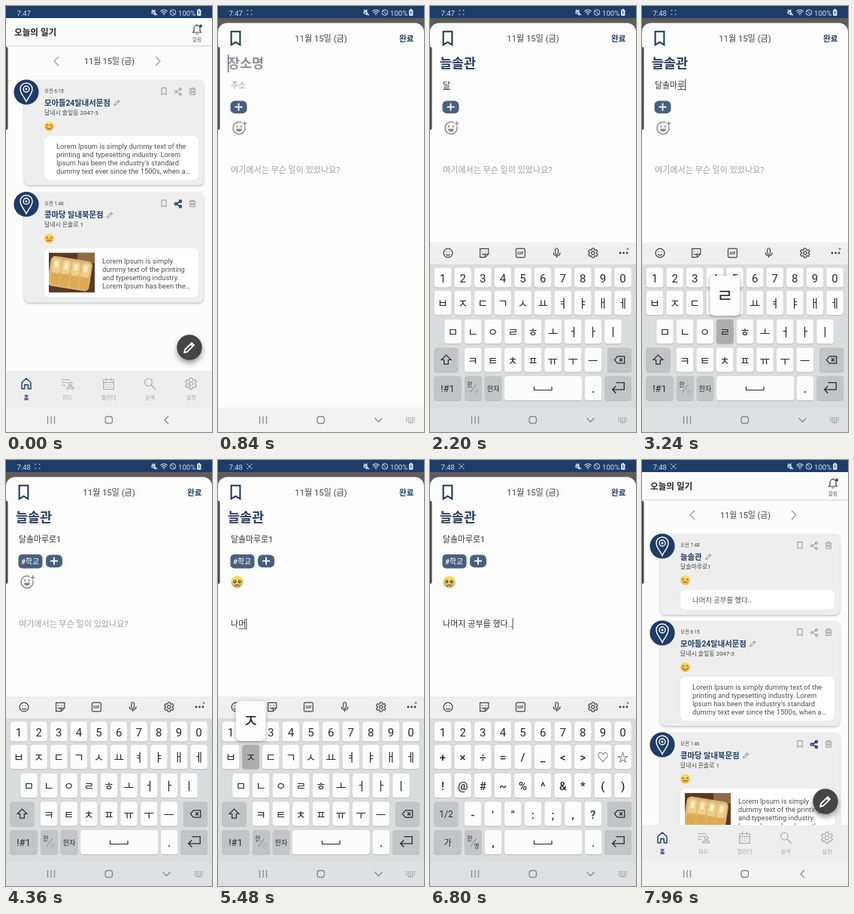
These frames come from a looping animation (274 px wide and 564 px high, 8000 ms). An HTML page with a canvas:

```html
<!DOCTYPE html>
<html lang="ko">
<head>
<meta charset="utf-8">
<title>오늘의 일기</title>
<style>
html, body { margin: 0; width: 100%; height: 100%; overflow: hidden; background: #fcfcfc; }
canvas { display: block; width: 274px; height: 564px; }
</style>
</head>
<body>
<canvas id="stage"></canvas>
<script>
const W = 274, H = 564, LOOP = 8000;
const canvas = document.getElementById('stage');
const dpr = window.devicePixelRatio || 1;
canvas.width = W * dpr;
canvas.height = H * dpr;
const c = canvas.getContext('2d');

const NAVY = '#1f3c66', BAR = '#1d3d69', CHIP = '#48607f', GREY = '#9a9a9a';
const FONT = 'Roboto, "Noto Sans CJK KR", "Noto Sans CJK", sans-serif';
const TITLE = '늘솔관', ADDRESS = '달솔마루로1', MEMO = '나머지 공부를 했다..', DATE = '11월 15일 (금)';

// Icons on a 24 unit grid
const ICON = {
  bookmark: 'M6 3h12v18l-6-3.5-6 3.5z',
  share: 'M7 12L18 5M7 12l11 7M8.5 12a3 3 0 1 1-6 0 3 3 0 0 1 6 0M21 5a3 3 0 1 1-6 0 3 3 0 0 1 6 0M21 19a3 3 0 1 1-6 0 3 3 0 0 1 6 0',
  trash: 'M3 6h18M8 6V3h8v3M5 6v15h14V6M9 10v7M12 10v7M15 10v7',
  pencil: 'M3 21l1-5L16 4l4 4L8 20zM14 6l4 4',
  bell: 'M4 18h16l-2-3v-5a6 6 0 0 0-12 0v5zM10 21h4M12 4V2',
  home: 'M4 10l8-7 8 7v11h-5v-7H9v7H4z',
  feed: 'M2 5h15M2 10h10M2 15h7M20 12a3 3 0 1 1-6 0 3 3 0 0 1 6 0M11 21c1-5 11-5 12 0z',
  calendar: 'M3 5h18v17H3zM3 10h18M8 2v5M16 2v5M7 14h2M11 14h2M15 14h2M7 18h2M11 18h2M15 18h2',
  search: 'M16 9.5a6.5 6.5 0 1 1-13 0 6.5 6.5 0 0 1 13 0M14.5 14.5L22 22',
  gear: 'M15.5 12a3.5 3.5 0 1 1-7 0 3.5 3.5 0 0 1 7 0M10 2h4l.6 3 2.2 1.2 3-1 2 3.6-2.3 2v2.4l2.3 2-2 3.6-3-1-2.2 1.2-.6 3h-4l-.6-3-2.2-1.2-3 1-2-3.6 2.3-2v-2.4l-2.3-2 2-3.6 3 1L9.4 5z',
  smiley: 'M21.5 12a9.500 9.500 0 1 1-19 0 9.500 9.500 0 0 1 19 0M7.500 14c2 4 7 4 9 0M8.500 8.500v1.500M15.500 8.500v1.500',
  sticker: 'M3 3h18v11l-7 7H3zM21 14h-7v7M7 13c1 3 4 3 6 1M8 8v1.500M15 8v1.500',
  frame: 'M5 2.500h14q2.500 0 2.500 2.500v14q0 2.500-2.500 2.500H5q-2.500 0-2.500-2.500V5Q2.500 2.500 5 2.500z',
  mic: 'M9 5a3 3 0 0 1 6 0v7a3 3 0 0 1-6 0zM5 11c0 9 14 9 14 0M12 18v4',
  shift: 'M12 3l9 9h-5v8H8v-8H3z',
  erase: 'M8 5h14v14H8l-6-7zM12 9l6 6M18 9l-6 6',
  enter: 'M9 4h12v10H4M9 9l-5 5 5 5',
  mute: 'M3 9h4l6-5v16l-6-5H3zM3 2l18 20',
  wifi: 'M2 9c6-6 14-6 20 0M5.500 13c4-4 9-4 13 0M9 17c2-2 4-2 6 0M12 20v1',
  block: 'M21 12a9 9 0 1 1-18 0 9 9 0 0 1 18 0M6 6l12 12',
  corners: 'M3 7V3h4M17 3h4v4M21 17v4h-4M7 21H3v-4'
};

const clamp = v => Math.max(0, Math.min(1, v));
const ease = v => 1 - Math.pow(1 - clamp(v), 3);
const span = (t, a, b) => ease((t - a) / (b - a));

function text(s, x, cy, size, color, weight = 400, align = 'left') {
  c.font = `${weight} ${size}px ${FONT}`;
  c.textAlign = align;
  c.fillStyle = color;
  c.fillText(s, x, cy + size * 0.37);
  return c.measureText(s).width;
}
function box(x, y, w, h, r, color) {
  c.beginPath();
  c.roundRect(x, y, w, h, r);
  c.fillStyle = color;
  c.fill();
}
function disc(x, y, r, color) {
  c.beginPath();
  c.arc(x, y, r, 0, 7);
  c.fillStyle = color;
  c.fill();
}
function line(points, color, width = 1) {
  c.beginPath();
  for (let i = 0; i < points.length; i += 2) c.lineTo(points[i], points[i + 1]);
  c.strokeStyle = color;
  c.lineWidth = width;
  c.stroke();
}
function icon(name, cx, cy, size, color, width = 1) {
  const k = size / 24;
  c.save();
  c.translate(cx - size / 2, cy - size / 2);
  c.scale(k, k);
  c.strokeStyle = color;
  c.lineWidth = width / k;
  c.stroke(new Path2D(ICON[name]));
  c.restore();
}
function shadow(color, blur, dy, draw) {
  c.save();
  c.shadowColor = color;
  c.shadowBlur = blur * dpr;
  c.shadowOffsetY = dy * dpr;
  draw();
  c.restore();
}

function face(kind, x, y, r) {
  const g = c.createLinearGradient(0, y - r, 0, y + r);
  g.addColorStop(0, '#ffe36a');
  g.addColorStop(1, '#f3b23e');
  disc(x, y, r, g);
  c.save();
  c.translate(x, y);
  c.scale(r, r);
  const ink = '#7a4a1a';
  for (const s of [-1, 1]) {
    if (kind === 'smile') {
      disc(s * 0.6, 0.2, 0.2, '#f58a5a');
      c.beginPath();
      c.arc(s * 0.38, -0.1, 0.2, Math.PI, 0);
      c.strokeStyle = ink;
      c.lineWidth = 0.15;
      c.stroke();
    } else if (kind === 'squint') {
      line([s * 0.62, -0.3, s * 0.25, -0.12, s * 0.62, 0.02], ink, 0.12);
    } else {
      disc(s * 0.4, -0.08, 0.27, ink);
      disc(s * 0.46, -0.16, 0.1, '#fff');
      box(s * 0.45 - 0.17, 0.15, 0.34, 0.6, 0.15, '#7fc1ea');
    }
  }
  c.strokeStyle = ink;
  c.lineWidth = 0.15;
  c.beginPath();
  if (kind === 'smile') c.arc(0, 0.15, 0.45, 0.2, Math.PI - 0.2);
  else if (kind === 'squint') { c.moveTo(-0.45, 0.42); c.lineTo(0.45, 0.42); }
  else c.arc(0, 0.75, 0.28, Math.PI + 0.2, -0.2);
  c.stroke();
  c.restore();
}

function statusBar(t) {
  box(0, 0, W, 16, 0, BAR);
  const ink = '#d5dde8';
  text(t < 2700 ? '7:47' : '7:48', 14.500, 9, 9.500, ink);
  if (t > 500) icon('corners', 42, 8.500, 8, '#a9b7ca');
  if (t > 5000) disc(42, 8.500, 1.500, '#a9b7ca');
  icon('mute', 197.500, 8.500, 9, ink, 1.300);
  icon('wifi', 210, 8.500, 11, ink, 1.200);
  icon('block', 222, 8.500, 10, ink);
  text('100%', 229, 9, 9.600, ink);
  box(254, 5, 5.500, 8, 1, ink);
  box(255.500, 3.800, 2.500, 1.500, 0, ink);
  line([256.700, 6.500, 256.700, 10.500], BAR, 1);
}

function pin(x, y) {
  disc(x, y, 16.600, NAVY);
  c.strokeStyle = '#fff';
  c.lineWidth = 1.400;
  c.save();
  c.translate(x, y);
  c.stroke(new Path2D('M0 12.500C-3 6-8 2-8-4a8 8 0 0 1 16 0C8 2 3 6 0 12.500z'));
  c.beginPath();
  c.arc(0, -4, 4, 0, 7);
  c.stroke();
  c.restore();
  disc(x, y - 4, 1.500, '#fff');
}

function photo(x, y) {
  c.save();
  c.beginPath();
  c.rect(x, y, 61, 53);
  c.clip();
  box(x, y, 61, 53, 0, '#5a3a22');
  box(x + 38, y, 23, 14, 0, '#8d6a48');
  c.translate(x + 29, y + 28);
  c.rotate(0.16);
  box(-29, -20, 56, 40, 6, '#d9b57a');
  for (let i = 0; i < 4; i++) {
    box(-26 + i * 13, -17, 11.500, 19, 4, '#efcf86');
    box(-25 + i * 13, 2, 11.500, 16, 4, '#dfa950');
    box(-23 + i * 13, -14, 5, 9, 2, '#faeec6');
  }
  c.restore();
}

function card(top, h, e) {
  shadow('rgba(0,0,0,.22)', 3, 1.500, () => box(24, top, 239, h, 7, '#eeeeef'));
  pin(27, top + 16);
  text(e.time, 51, top + 15, 6.400, '#444');
  const w = text(e.title, 51, top + 30, 10.300, NAVY, 700);
  icon('pencil', 51 + w + 9, top + 30, 10, '#888');
  text(e.address, 51, top + 43, 7.900, '#444');
  icon('bookmark', 210, top + 15, 12, GREY);
  icon('share', 229, top + 15.500, 12, e.shared ? NAVY : GREY, e.shared ? 1.500 : 1);
  icon('trash', 248, top + 15, 11.500, GREY);
  face(e.face, 57.500, top + 61, 6.500);
  box(51, top + 74, 205, h - 81, 7, '#fff');
  if (e.photo) photo(57, top + 80);
  const x = e.photo ? 128 : 67;
  e.lines.forEach((s, i) => text(s, x, top + (e.photo ? 91 : 88) + i * 10.900, 9.400, '#505050'));
}

const ENTRIES = [
  { h: 139, time: '오전 6:15', title: '모아들24달내서문점', address: '달내시 솔잎동 2047-3', face: 'smile',
    lines: ['Lorem Ipsum is simply dummy text of the', 'printing and typesetting industry. Lorem', "Ipsum has been the industry's standard", 'dummy text ever since the 1500s, when a…'] },
  { h: 146, time: '오전 1:46', title: '콩마당 달내북문점', address: '달내시 은솔로 1', face: 'squint', shared: true, photo: true,
    lines: ['Lorem Ipsum is simply', 'dummy text of the printing', 'and typesetting industry.', 'Lorem Ipsum has been the…'] }
];
const ADDED = { h: 107, time: '오전 7:48', title: TITLE, address: ADDRESS, face: 'squint', lines: [MEMO] };

function listPage(t) {
  box(0, 0, W, H, 0, '#fcfcfc');
  text('오늘의 일기', 11, 35, 11.600, '#222', 700);
  icon('bell', 254, 31, 16, '#444', 1.200);
  disc(259, 26.500, 2, '#444');
  text('알림', 254, 45, 6.500, '#555', 400, 'center');
  box(0, 52.500, W, 1, 0, '#cfcfcf');
  line([70, 67, 64, 73, 70, 79], GREY, 1.200);
  line([199, 67, 205, 73, 199, 79], GREY, 1.200);
  text(DATE, 137.500, 73, 10.800, '#444', 400, 'center');
  if (t > 6950) {
    card(98, ADDED.h, ADDED);
    card(213, ENTRIES[0].h, ENTRIES[0]);
    card(361, ENTRIES[1].h, ENTRIES[1]);
  } else {
    card(98, ENTRIES[0].h, ENTRIES[0]);
    card(246.500, ENTRIES[1].h, ENTRIES[1]);
  }
  shadow('rgba(0,0,0,.4)', 7, 4, () => disc(244, 452, 16.700, '#454545'));
  icon('pencil', 244, 452, 18, '#fff', 1.800);
  box(0, 483, W, 49, 0, '#eeeeef');
  ['home', 'feed', 'calendar', 'search', 'gear'].forEach((name, i) => {
    const x = 27 + i * 54.750, on = i === 0;
    icon(name, x, 500, 18, on ? NAVY : '#aaa', on ? 1.400 : 1.200);
    text(['홈', '피드', '캘린더', '검색', '설정'][i], x, 518.500, 7.300, on ? NAVY : '#aaa', on ? 700 : 400, 'center');
  });
}

// Typing: each key shows its popup for a moment, then commits the next state
const events = [];
function type(field, start, step, keys, states) {
  const list = states.split('|');
  [...keys].forEach((key, i) => events.push({ field, t: start + i * step, key, s: list[i], hold: Math.min(70, step * 0.85) }));
}
type('title', 1080, 84, 'ㄴㅡㄹㅅㅗㄹㄱㅗㅏㄴ', 'ㄴ|느|늘|늘ㅅ|늘소|늘솔|늘솔ㄱ|늘솔고|늘솔과|늘솔관');
type('address', 2040, 70, 'ㄷㅏㄹ', 'ㄷ|다|달');
type('address', 2300, 137, 'ㅅㅗㄹㅁㅏㄹㅜㄹㅗ1', '달ㅅ|달소|달솔|달솔ㅁ|달솔마|달솔말|달솔마루|달솔마룰|달솔마루로|' + ADDRESS);
type('tag', 3900, 100, 'ㅎㅏㄱㄱㅛ', 'ㅎ|하|학|학ㄱ|학교');
type('memo', 5160, 86, 'ㄴㅏㅁㅓㅈ', 'ㄴ|나|남|나머|나멎');
type('memo', 5560, 58, 'ㅣ ㄱㅗㅇㅂㅜㄹㅡㄹ ㅎㅐㅅㄷㅏ',
  '나머지|나머지 |나머지 ㄱ|나머지 고|나머지 공|나머지 공ㅂ|나머지 공부|나머지 공불|나머지 공부르|나머지 공부를|나머지 공부를 |나머지 공부를 ㅎ|나머지 공부를 해|나머지 공부를 했|나머지 공부를 했ㄷ|나머지 공부를 했다');
type('memo', 6600, 90, '..', '나머지 공부를 했다.|' + MEMO);

function value(field, t) {
  let s = '';
  for (const e of events) if (e.field === field && e.t <= t) s = e.s;
  return s;
}
function pressed(t) {
  const e = events.find(e => t >= e.t - e.hold && t < e.t);
  return e ? e.key : null;
}

function input(s, hint, x, cy, size, weight, color, focus, t) {
  const w = s ? text(s, x, cy, size, color, weight) : 0;
  if (!s) text(hint, x, cy, size, weight > 400 ? '#8b929b' : '#a0a0a0', weight);
  if (!focus) return;
  const last = s.slice(-1);
  if (/[ㄱ-힣]/.test(last)) {
    const lw = c.measureText(last).width;
    box(x + w - lw, cy + size * 0.530, lw, 0.800, 0, color);
  }
  if ((t + 780) % 1000 < 640) box(x + w, cy - size * 0.680, 1, size * 1.360, 0, '#444');
}
function plusChip(x) {
  box(x, 125.500, 22, 16.800, 6, CHIP);
  line([x + 6, 133.700, x + 16, 133.700], '#fff', 1.800);
  line([x + 11, 128.700, x + 11, 138.700], '#fff', 1.800);
}

function sheet(t, y) {
  c.save();
  c.translate(0, y);
  box(0, 22.500, W, H, [12, 12, 0, 0], '#fdfdfd');
  icon('bookmark', 23.500, 42.500, 23.500, NAVY, 2.100);
  text(DATE, 137, 43, 11.200, '#444', 400, 'center');
  text('완료', 241, 43, 10.600, NAVY, 700);
  const focus = t < 1980 ? 'title' : t < 3680 ? 'address' : t < 4500 ? 'tag' : t < 5050 ? '' : 'memo';
  input(value('title', t), '장소명', 13, 76, 17.400, 700, '#263d5c', focus === 'title', t);
  input(value('address', t), '주소', 17, 104.500, 10.900, 400, '#333', focus === 'address', t);
  const tag = value('tag', t);
  if (tag || focus === 'tag') {
    c.font = `500 9.800px ${FONT}`;
    const w = c.measureText('#' + tag).width;
    box(16.500, 125, w + 8, 18.500, 5, CHIP);
    text('#' + tag, 20, 134, 9.800, '#fff', 500);
    plusChip(w + 29);
  } else plusChip(16.500);
  if (t > 4850) face('cry', 25.500, 161.500, 8.300);
  else {
    const ink = '#8b8b8b';
    c.beginPath();
    c.arc(28, 161.500, 8, -0.250, 5.150);
    c.strokeStyle = ink;
    c.lineWidth = 1.500;
    c.stroke();
    disc(25.300, 159.500, 1.200, ink);
    disc(30.700, 159.500, 1.200, ink);
    c.beginPath();
    c.arc(28, 162.500, 4, 0, Math.PI);
    c.fillStyle = ink;
    c.fill();
    line([32.500, 155.500, 38.500, 155.500], ink, 1.400);
    line([35.500, 152.500, 35.500, 158.500], ink, 1.400);
  }
  input(value('memo', t), '여기에서는 무슨 일이 있었나요?', 17, 217, 11.050, 400, '#333', focus === 'memo', t);
  c.restore();
}

function keyboard(t, y) {
  const symbols = t > 6510, down = pressed(t), ink = '#2b2b2b';
  let popup = null;
  const key = (label, cx, top, w, h, size = 15, dark = false) => {
    const hit = label && label === down;
    shadow('rgba(0,0,0,.18)', 1, 0.800, () => box(cx - w / 2, top, w, h, 3.500, hit ? '#adadad' : dark ? '#c3c4c6' : '#fcfcfc'));
    if (label) text(label, cx, top + h / 2 + 0.500, size, ink, /[0-9가-힣]/.test(label) ? 400 : 500, 'center');
    if (hit) popup = { label, cx, top };
  };
  const row = (chars, x, top, h) => [...chars].forEach((ch, i) => key(ch, x + i * 26.620, top, 22.500, h));

  c.save();
  c.beginPath();
  c.rect(0, 16, W, 516);
  c.clip();
  c.translate(0, y);
  box(0, 313, W, 30, 0, '#efefef');
  box(0, 342, W, 200, 0, '#dbdcdd');
  ['smiley', 'sticker', 'frame', 'mic', 'gear'].forEach((n, i) => icon(n, 24 + i * 48.200, 327, 15, '#444', 1.200));
  text('GIF', 120.400, 327, 5.500, '#444', 700, 'center');
  for (let i = 0; i < 3; i++) disc(253 + i * 4.500, 327, 1.400, '#444');
  disc(263, 321.500, 1.500, '#b8875a');

  row('1234567890', 17, 346.500, 26);
  if (symbols) {
    row('+×÷=/_<>♡☆', 17, 377, 32);
    row('!@#~%^&*()', 17, 415, 32);
    row('-\'":;,?', 57, 452.500, 32);
  } else {
    row('ㅂㅈㄷㄱㅅㅛㅕㅑㅐㅔ', 17, 377, 32);
    row('ㅁㄴㅇㄹㅎㅗㅓㅏㅣ', 30.500, 415, 32);
    row('ㅋㅌㅊㅍㅠㅜㅡ', 57, 452.500, 32);
  }
  key(symbols ? '1/2' : '', 21.500, 452.500, 32, 32, 12, true);
  if (!symbols) icon('shift', 21.500, 468.500, 17, ink, 1.200);
  key('', 252, 452.500, 32, 32, 12, true);
  icon('erase', 252, 468.500, 16, ink, 1.200);
  key(symbols ? '가' : '!#1', 23.500, 490, 36, 32, symbols ? 11 : 13, true);
  key('', 57.500, 490, 23, 32, 10, true);
  text('한', 53, 501, 8, ink, 400, 'center');
  line([53.500, 512, 61.500, 501], '#777', 0.800);
  text('영', 62, 511, 7.500, symbols ? ink : '#aaa', 400, 'center');
  key(symbols ? ',' : '한자', 84, 490, 22.500, 32, symbols ? 15 : 9, !symbols);
  key('', 150.500, 490, 103, 32);
  line([138.500, 504, 138.500, 508.500, 162, 508.500, 162, 504], ink, 1.200);
  key('.', 217, 490, 22.500, 32);
  key('', 250, 490, 36, 32, 10, true);
  icon('enter', 250, 506, 22, ink, 1.300);

  if (popup) {
    const px = Math.max(3, Math.min(W - 43, popup.cx - 20));
    shadow('rgba(0,0,0,.35)', 4, 1, () => box(px, popup.top - 58, 40, 53, 6, '#fdfdfd'));
    text(popup.label, px + 20, popup.top - 31.500, 24, ink, 500, 'center');
  }
  c.restore();
}

function systemBar(editing, kb) {
  box(0, 532, W, 32, 0, kb > 0.500 ? '#dfe0e1' : '#f2f2f2');
  const ink = '#8a8a8a';
  for (let i = 0; i < 3; i++) line([55.500 + i * 4.500, 543, 55.500 + i * 4.500, 553], ink, 1.300);
  c.beginPath();
  c.roundRect(132, 543.500, 9.500, 9, 3);
  c.strokeStyle = ink;
  c.lineWidth = 1.300;
  c.stroke();
  if (!editing) return line([216, 543, 211, 548, 216, 553], ink, 1.300);
  line([208.500, 545.500, 213.500, 550.500, 218.500, 545.500], ink, 1.300);
  for (let r = 0; r < 3; r++)
    for (let i = 0; i < 5; i++) box(250.500 + i * 2.500, 544.500 + r * 2.300, 1.200, 1.200, 0, ink);
  box(253, 551.300, 6.500, 0.900, 0, ink);
}

function draw(t) {
  c.setTransform(dpr, 0, 0, dpr, 0, 0);
  const up = span(t, 440, 800) - span(t, 7040, 7380);
  const kb = span(t, 850, 1020) - span(t, 6960, 7120);
  listPage(t);
  if (up > 0) {
    box(0, 16, W, 516, 0, `rgba(12,6,2,${0.650 * up})`);
    sheet(t, (1 - up) * 512);
  }
  if (kb > 0) keyboard(t, (1 - kb) * 219);
  systemBar(up > 0.500, kb);
  statusBar(t);
  box(-3, 54, 5.500, 110, 2.500, '#4a4a4a');
}

const begin = performance.now();
function tick() {
  draw((performance.now() - begin) % LOOP);
  requestAnimationFrame(tick);
}
tick();
</script>
</body>
</html>
```
